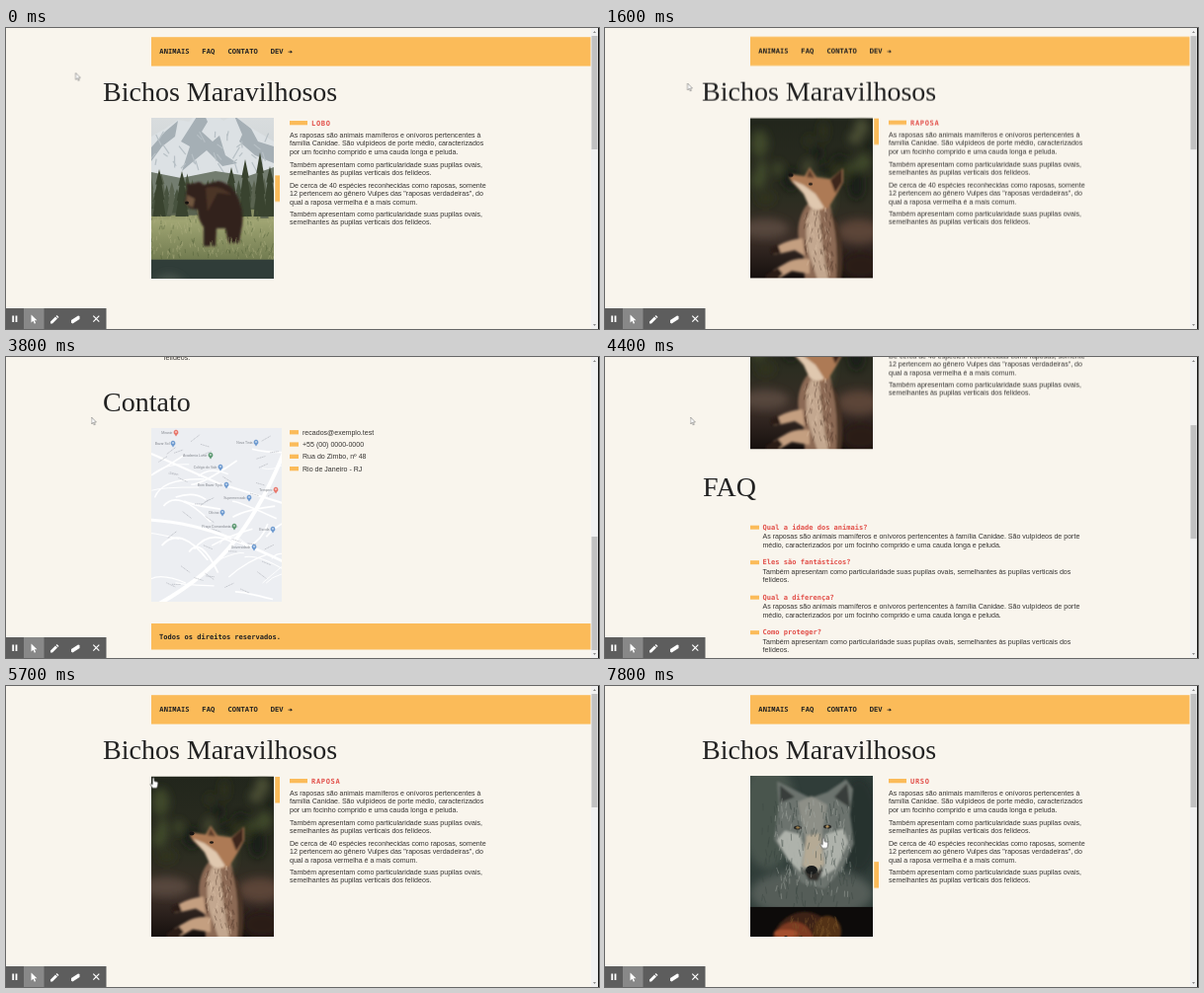
Write an HTML page that moves like this. It is 600 px wide and 305 px high and loops after 8000 ms.

```html
<!DOCTYPE html>
<html lang="pt-BR">
<head>
<meta charset="utf-8">
<title>Bichos Maravilhosos</title>
<style>
html, body { margin: 0; width: 100%; height: 100%; overflow: hidden; background: #f9f5ed; }
svg { display: block; }
text { fill: #363432; font: 7.05px "Liberation Sans", Arial, sans-serif; white-space: pre; }
.h1 { font: 28px "Liberation Serif", serif; fill: #222; }
.mono { font: bold 7.05px "DejaVu Sans Mono", monospace; fill: #222; }
.nav { font: 600 7.1px "Noto Sans Mono", monospace; letter-spacing: .08px; }
.red { fill: #e2504a; }
.label { letter-spacing: .65px; }
.tiny { font-size: 3.4px; fill: #81858c; }
.bar { fill: #fbbb59; }
</style>
</head>
<body>
<svg width="600" height="305" viewBox="0 0 600 305">
  <defs>
    <clipPath id="frame"><rect x="147" y="91.5" width="123.5" height="162"/></clipPath>
    <clipPath id="mapFrame"><rect x="147" y="529" width="132" height="176"/></clipPath>
    <clipPath id="photo"><rect width="124" height="163.8"/></clipPath>
    <filter id="soft"><feGaussianBlur stdDeviation="4"/></filter>
    <filter id="fuzz"><feGaussianBlur stdDeviation=".8"/></filter>
    <linearGradient id="meadow" x2="0" y2="1"><stop stop-color="#69724f"/><stop offset=".35" stop-color="#a0a573"/><stop offset="1" stop-color="#717b50"/></linearGradient>
    <linearGradient id="sky" x2="0" y2="1"><stop stop-color="#dde0e1"/><stop offset="1" stop-color="#b8c2c6"/></linearGradient>
    <linearGradient id="woods" x2="0" y2="1"><stop stop-color="#22261c"/><stop offset=".5" stop-color="#2c2d21"/><stop offset=".75" stop-color="#3a2d27"/><stop offset="1" stop-color="#150f0d"/></linearGradient>
  </defs>
  <rect width="600" height="305" fill="#f9f5ed"/>
  <g id="page">
    <rect class="bar" x="147" y="9.2" width="444.5" height="29.4"/>
    <g id="nav"></g>
    <g id="animals">
      <text class="h1" x="98" y="74">Bichos Maravilhosos</text>
      <g clip-path="url(#frame)"><g id="list"></g></g>
      <rect id="grip" class="bar" x="272.3" y="92" width="4.7" height="26.5"/>
      <g id="copy"><rect class="bar" x="287" y="94" width="18" height="4.3"/></g>
    </g>
    <g id="faq"><text class="h1" x="99" y="302">FAQ</text></g>
    <g id="contact"><text class="h1" x="98" y="512">Contato</text></g>
    <rect class="bar" x="147" y="727" width="444.5" height="26.5"/>
    <text class="mono" x="155" y="743">Todos os direitos reservados.</text>
  </g>
  <rect x="592" width="7" height="305" fill="#f1f1f1"/>
  <rect id="thumb" x="592.5" y="8" width="6" height="115" fill="#c1c1c1"/>
  <path d="M594 4.8l1.5-1.6 1.5 1.6zM594 300.2l1.5 1.6 1.5-1.6z" fill="#666"/>
  <rect x="599" width="1" height="305" fill="#161616"/>
  <g>
    <rect y="284" width="101.5" height="21" fill="#5d5d5d"/>
    <rect x="18" y="284" width="20.5" height="21" fill="#888"/>
    <g fill="#fff">
      <path d="M6.3 291.5h1.8v6.5h-1.8zM9.6 291.5h1.8v6.5h-1.8z"/>
      <path d="M25.5 290.5v8l2-1.8 1.3 3 1.3-.6-1.3-2.9h2.6z"/>
      <path d="M45 299.5v-2l5-5 2 2-5 5zM50.6 291.9l.9-.9 2 2-.9.9z"/>
      <path d="M66 296l7-4.5 1.5.6v2.8l-7 4.6-1.5-.8z"/>
    </g>
    <path d="M88.3 291.7l6 6m0-6l-6 6" stroke="#fff" stroke-width="1.2"/>
  </g>
  <g id="pointer">
    <path id="arrow" d="M0 0v6.9l1.6-1.5 1.1 2.5 1-.4L2.7 5h2.1z" fill="#fff" stroke="#555" stroke-width=".5"/>
    <path id="hand" d="M-.8 0q.9-.9 1.8 0v3l3 .7q1 .4.8 1.5L4.2 8.4 3.5 10H-.7L-3 6.8q-.5-1.2.6-1.3L-.8 6.4z" fill="#fff" stroke="#333" stroke-width=".55"/>
  </g>
</svg>
<script>
const LOOP = 8000, MAX_SCROLL = 457, PITCH = 163.3, VIEW = 162;
const $ = id => document.getElementById(id);
const add = (id, markup) => $(id).insertAdjacentHTML('beforeend', markup);
const text = (x, y, str, cls = '', id = '') => `<text x="${x}" y="${y}" class="${cls}" id="${id}">${str}</text>`;
const shape = (d, fill, extra = '') => `<path d="${d}" fill="${fill}" ${extra}/>`;
const oval = (x, y, rx, ry, fill, extra = '') => `<ellipse cx="${x}" cy="${y}" rx="${rx}" ry="${ry}" fill="${fill}" ${extra}/>`;
const SOFT = 'filter="url(#soft)"', FUZZ = 'filter="url(#fuzz)"';

let seed = 7;
const rand = (min = 0, max = 1) => {
  seed = (seed * 16807) % 2147483647;
  return min + (max - min) * seed / 2147483647;
};
const many = (n, draw) => Array.from({ length: n }, (_, i) => draw(i)).join('');

// Page copy
[[155.3, 'ANIMAIS'], [198.3, 'FAQ'], [224.5, 'CONTATO'], [267.7, 'DEV']]
  .forEach(([x, str]) => add('nav', text(x, 26, str, 'mono nav')));
add('nav', '<path d="M285.5 23.8h2.2v-1.2l2.2 1.6-2.2 1.6v-1.2h-2.2z" fill="#222"/>');

['Lobo', 'Raposa', 'Esquilo', 'Urso'].forEach(name =>
  add('copy', text(309, 98.7, name.toUpperCase(), 'mono red label', name)));

const traits = ['Também apresentam como particularidade suas pupilas ovais,', 'semelhantes às pupilas verticais dos felídeos.'];
[
  [111, ['As raposas são animais mamíferos e onívoros pertencentes à', 'família Canidae. São vulpídeos de porte médio, caracterizados', 'por um focinho comprido e uma cauda longa e peluda.']],
  [140.8, traits],
  [162, ['De cerca de 40 espécies reconhecidas como raposas, somente', '12 pertencem ao gênero Vulpes das "raposas verdadeiras", do', 'qual a raposa vermelha é a mais comum.']],
  [191, traits]
].forEach(([y, lines]) => lines.forEach((line, i) => add('copy', text(287, y + i * 8.4, line))));

const answers = [
  ['As raposas são animais mamíferos e onívoros pertencentes à família Canidae. São vulpídeos de porte', 'médio, caracterizados por um focinho comprido e uma cauda longa e peluda.'],
  ['Também apresentam como particularidade suas pupilas ovais, semelhantes às pupilas verticais dos', 'felídeos.']
];
['Qual a idade dos animais?', 'Eles são fantásticos?', 'Qual a diferença?', 'Como proteger?'].forEach((question, i) => {
  const y = 335.5 + i * 35.5;
  add('faq', `<rect class="bar" x="147" y="${y - 4.3}" width="9" height="4"/>`
    + text(159.5, y, question, 'mono red')
    + answers[i % 2].map((line, k) => text(159.5, y + 9.4 + k * 8.4, line)).join(''));
});

['recados@exemplo.test', '+55 (00) 0000-0000', 'Rua do Zimbo, nº 48', 'Rio de Janeiro - RJ'].forEach((line, i) => {
  const y = 535.8 + i * 12.3;
  add('contact', `<rect class="bar" x="287" y="${y - 4.7}" width="9" height="4.3"/>` + text(300, y, line));
});

// Street map
const road = (d, w) => `<path d="${d}" fill="none" stroke="#fff" stroke-width="${w}"/>`;
const pins = [
  [172, 77, '#e8776c', 'Mirante'], [169, 88, '#6f9bd0', 'Bazar Sol'], [253, 87, '#6f9bd0', 'Nova Tinta'],
  [207, 100, '#5f9a74', 'Academia Lume'], [217, 112, '#6f9bd0', 'Colégio do Vale'], [223, 130, '#6f9bd0', 'Bom Bazar Tijolo'],
  [273, 135, '#e8776c', 'Tempero'], [246, 143, '#6f9bd0', 'Supermercado'], [219, 158, '#6f9bd0', 'Oficina'],
  [231, 172, '#5f9a74', 'Praça Comandante'], [270, 175, '#6f9bd0', 'Escola'], [251, 193, '#6f9bd0', 'Universidade']
];
add('contact', `<g clip-path="url(#mapFrame)"><g transform="translate(0 457)">
  <rect x="147" y="72" width="132" height="176" fill="#eceef2"/>`
  + many(30, () => {
    const x = rand(140, 275), y = rand(72, 245);
    return road(`M${x} ${y}q${rand(5, 20)} ${rand(-22, 6)} ${rand(20, 50)} ${rand(-30, 22)}`, rand(.8, 1.8));
  })
  + road('M155 250Q205 222 234 183T283 92', 4) + road('M145 165Q190 168 228 184T282 208', 2.8) + road('M147 98L215 128 280 148', 2)
  + many(40, () => {
    const x = rand(150, 268), y = rand(85, 242);
    return `<path d="M${x} ${y}l9 ${rand(-7, 7)}" stroke="#b4b7bd" stroke-width=".7" stroke-dasharray="1.3 .5"/>`;
  })
  + pins.map(([x, y, color, name]) => shape(`M${x} ${y + 3.4}l-2.2-3.2a2.4 2.4 0 1 1 4.4 0z`, color)
    + `<circle cx="${x}" cy="${y - 1}" r=".8" fill="#fff"/><text class="tiny" text-anchor="end" x="${x - 3.5}" y="${y + 1}">${name}</text>`).join('')
  + '</g></g>');

// Photographs, each in its own 124 x 163 box
const box = fill => `<rect width="124" height="164" fill="${fill}"/>`;
const pine = (x, top, base, w, fill) => {
  const h = base - top;
  return shape(`M${x} ${top}l${w * .35} ${h * .32}h${-w * .12}l${w * .25} ${h * .33}h${-w * .12}l${w * .25} ${h * .35}H${x - w * .6}l${w * .25} ${-h * .35}h${-w * .12}l${w * .25} ${-h * .33}h${-w * .12}z`, fill);
};
const strands = (n, x0, x1, y0, y1, len, color) => many(n, () =>
  `<path d="M${rand(x0, x1)} ${rand(y0, y1)}l${rand(-2, 2)} ${len}" stroke="${color}" stroke-width=".8" opacity=".55"/>`);

const fox = () => box('url(#woods)')
  + `<g ${SOFT}>` + many(22, i => oval(rand(0, 124), rand(5, 85), rand(3, 9), rand(5, 15), ['#3f482c', '#171a14', '#4b4f35', '#30351f'][i % 4]))
  + oval(15, 112, 24, 10, '#57463d') + oval(110, 115, 22, 12, '#5b4438') + oval(112, 150, 20, 14, '#2b1c18') + '</g>'
  + `<g ${FUZZ}>`
  + shape('M57 88Q46 104 49 124L54 141 55 164H91Q94 140 89 120L79 82z', '#8c6b54')
  + shape('M61 92Q53 112 59 137L68 164H79Q72 130 70 95z', '#c3a78f')
  + shape('M80 92Q90 118 87 164H92Q96 130 88 108z', '#4a3428')
  + shape('M53 122Q40 123 29 129L22 133 24 138 32 137 45 134 55 140zM60 143Q47 141 38 146L24 154 18 162H30L42 155 60 158z', '#c49f80')
  + shape('M28 129l-8 4 2 5 9-1zM28 152l-12 7-1 5h11l7-6z', '#2c1d19')
  + shape('M42 57L55 59 60 50 67 60 81 62 94 51 94 65 87 78 79 91Q67 97 59 88L54 77 42 65 39 60z', '#ad7a55')
  + shape('M42 63L54 68 66 77 75 91Q65 97 59 88L54 77z', '#e0c8af')
  + shape('M81 63L93 52 93 65 86 76z', '#3d281e') + shape('M57 60l3-8 5 9z', '#5b3c2a')
  + '</g>' + oval(41, 58, 2.6, 2, '#171412') + oval(61, 67, 2, 1.2, '#211a15')
  + strands(60, 54, 87, 92, 158, 5, '#553c2d') + strands(45, 56, 82, 90, 155, 5, '#dbc1a6');

const squirrel = () => box('#0b0b0c')
  + `<g ${FUZZ}>` + oval(86, 80, 23, 43, '#85491d') + oval(59, 96, 31, 30, '#c48341') + oval(51, 65, 23, 23, '#b87335')
  + shape('M34 51l-1-17 12 11zM58 47l9-15 4 20z', '#8d501f') + oval(60, 108, 20, 16, '#dfad70') + '</g>'
  + oval(43, 63, 2.8, 3, '#161009') + oval(36, 73, 2.2, 1.6, '#40220f')
  + strands(80, 32, 94, 87, 121, 6, '#e3b376')
  + `<g ${FUZZ}>` + shape('M0 129Q60 124 124 129V164H0z', '#151517') + oval(46, 126, 9, 3.5, '#cd9660') + oval(76, 126, 9, 3.5, '#c38a53') + '</g>';

const bear = () => box('url(#sky)')
  + shape('M0 39L14 31 27 22 38 24 51 10 61 13 73 23 84 17 96 27 124 44V100H0z', '#dce1e4')
  + shape('M51 11L57 24 51 34 62 44 69 38 75 58 87 66 72 69 56 53 45 62 31 74 39 49 30 44zM84 18L92 37 89 44 105 58 124 66V49L108 44 101 31zM27 23L24 39 11 49 0 64V50L14 34z', '#a5afb5')
  + many(34, () => `<path d="M${rand(0, 124)} ${rand(32, 68)}l${rand(-7, 7)} ${rand(3, 12)}" stroke="#b7c0c5" stroke-width="1.2"/>`)
  + shape('M0 75L30 81 65 74 98 79 124 70V125H0z', '#737d70')
  + '<rect y="103" width="124" height="61" fill="url(#meadow)"/>'
  + many(25, i => pine(i * 5.2, rand(76, 92), rand(105, 122), rand(6, 11), i % 2 ? '#48533f' : '#5a6350'))
  + [[8, 72], [31, 74], [81, 70], [95, 62], [110, 55], [120, 69]].map(([x, top]) => pine(x, top, 120, 11, '#39432f')).join('')
  + strands(130, 0, 124, 118, 160, 4, '#b2b284') + strands(80, 0, 124, 114, 160, 4, '#4f5d37')
  + `<g ${FUZZ}>`
  + shape('M36 91Q34 85 39 87L45 86Q49 83 53 88L68 84Q83 87 89 104 95 119 91 134L89 147H78L75 132 66 132 65 150H53L53 131Q47 123 47 113L39 112 34 106z', '#33241d')
  + shape('M55 91Q69 87 81 98L67 96 57 115z', '#4b3427') + shape('M36 98L44 102 42 111 35 107z', '#71563f')
  + '</g>' + oval(36, 106, 2, 1.6, '#16110f') + strands(25, 50, 90, 140, 147, 8, '#8d9364');

const wolf = () => box('#303d39')
  + `<g ${SOFT}>` + oval(18, 70, 28, 55, '#49554e') + oval(110, 80, 22, 50, '#25312f') + oval(62, 150, 62, 25, '#545d58') + '</g>'
  + `<g ${FUZZ}>`
  + shape('M29 62L27 36 43 44 61 53 78 47 97 34 104 44 101 70 105 99 93 126 75 145 52 139 38 116 24 95z', '#6c736e')
  + shape('M30 58L30 40 45 52zM85 52L98 38 101 63z', '#393e3a')
  + shape('M35 86L50 90 58 115 51 128 39 116 27 96zM76 90L94 84 99 98 87 124 72 134z', '#aeb2ab')
  + shape('M48 57L62 51 78 60 73 86 76 121 63 135 51 126 56 96z', '#8d8f87')
  + shape('M57 91L70 89 75 120 64 129 53 121z', '#b5aa95') + shape('M53 125Q64 130 74 124L68 137 59 136z', '#302e2b')
  + '</g>' + oval(62, 126, 6, 4.5, '#191b1b')
  + oval(48, 83, 4, 2, '#282824') + oval(78, 82, 4, 2, '#282824') + oval(48, 83, 1.6, 1.2, '#b58b4c') + oval(78, 82, 1.6, 1.2, '#b58b4c')
  + strands(120, 25, 102, 53, 150, 6, '#a9aea8') + strands(140, 12, 108, 52, 160, 7, '#39443f');

const monkey = () => box('#0d0b0a')
  + `<g ${FUZZ}>` + oval(55, 44, 35, 39, '#3c2416') + oval(44, 39, 21, 24, '#7d3a24') + oval(78, 25, 14, 16, '#523319') + oval(36, 27, 12, 4, '#a5502f') + '</g>'
  + oval(36, 31, 2, 1.6, '#17100b') + oval(51, 31, 2, 1.6, '#17100b') + strands(70, 40, 88, 8, 40, 5, '#7d592b');

[fox, squirrel, bear, wolf, monkey].forEach((draw, i) =>
  add('list', `<g transform="translate(147 ${91.5 + i * PITCH})" clip-path="url(#photo)">${draw()}</g>`));

// Motion: each stop is [ms, value, easing]
const rules = [];
function track(id, stops, css) {
  const frames = stops.map(([t, v, ease = 'linear']) => `${t / LOOP * 100}% { ${css(v)}; animation-timing-function: ${ease} }`);
  rules.push(`@keyframes k-${id} { ${frames.join(' ')} } #${id} { animation: k-${id} ${LOOP}ms linear infinite }`);
}
const shiftY = k => v => `transform: translateY(${v * k}px)`;
const shown = v => `visibility: ${v ? 'visible' : 'hidden'}`;
const enter = v => `opacity: ${v}; transform: translateX(${(v - 1) * 13}px)`;

const scroll = [[0, 0], [1600, 0], [1800, 75], [2000, 185], [2200, 263], [2850, 263], [3100, 400], [3250, 400], [3500, MAX_SCROLL],
  [3820, MAX_SCROLL], [4500, 110], [4640, 110], [4880, 0], [LOOP, 0]];
track('page', scroll, shiftY(-1));
track('thumb', scroll, shiftY(174 / MAX_SCROLL));

const slide = [[0, 347], [680, 347], [681, 0], [5750, 0], [6000, 163], [6350, 163], [6500, 261], [6780, 350], [7350, 350], [7780, 521], [LOOP, 521]];
track('list', slide, shiftY(-1));
track('grip', slide, shiftY(VIEW / (PITCH * 6)));

track('animals', [[0, 1], [680, 1], [681, 0], [740, 0, 'ease'], [1040, 1], [5100, 1], [5101, 0], [5200, 0, 'ease'], [5500, 1], [LOOP, 1]], enter);
track('faq', [[0, 0], [2540, 0, 'ease'], [2840, 1], [5100, 1], [5101, 0], [LOOP, 0]], enter);
track('contact', [[0, 0], [3350, 0, 'ease'], [3700, 1], [5100, 1], [5101, 0], [LOOP, 0]], enter);
track('copy', [[0, 1], [6000, 1], [6001, 0, 'ease'], [6400, 1], [6950, 1], [6951, 0, 'ease'], [7350, 1], [LOOP, 1]], enter);

const during = (id, from, to) => track(id, [[0, from === 0], ...(from ? [[from - 1, false], [from, true]] : []),
  ...(to < LOOP ? [[to - 1, true], [to, false]] : []), [LOOP, to === LOOP]], shown);
during('Lobo', 0, 681);
during('Raposa', 681, 6000);
during('Esquilo', 6000, 6950);
during('Urso', 6950, LOOP);
during('hand', 5700, LOOP);
track('arrow', [[0, true], [2399, true], [2400, false], [2899, false], [2900, true], [5699, true], [5700, false], [LOOP, false]], shown);

track('pointer', [[0, [70.5, 45.5]], [900, [83.5, 56]], [1600, [83.5, 56]], [2200, [84.5, 59.5]], [2900, [86.5, 61]], [5450, [86.5, 61]],
  [5600, [110, 69]], [5900, [226, 141.5]], [7000, [226, 141.5]], [7400, [221, 154.5]], [LOOP, [221, 154.5]]],
  ([x, y]) => `transform: translate(${x}px, ${y}px)`);

const sheet = document.createElement('style');
sheet.textContent = rules.join('\n');
document.head.append(sheet);
</script>
</body>
</html>
```
